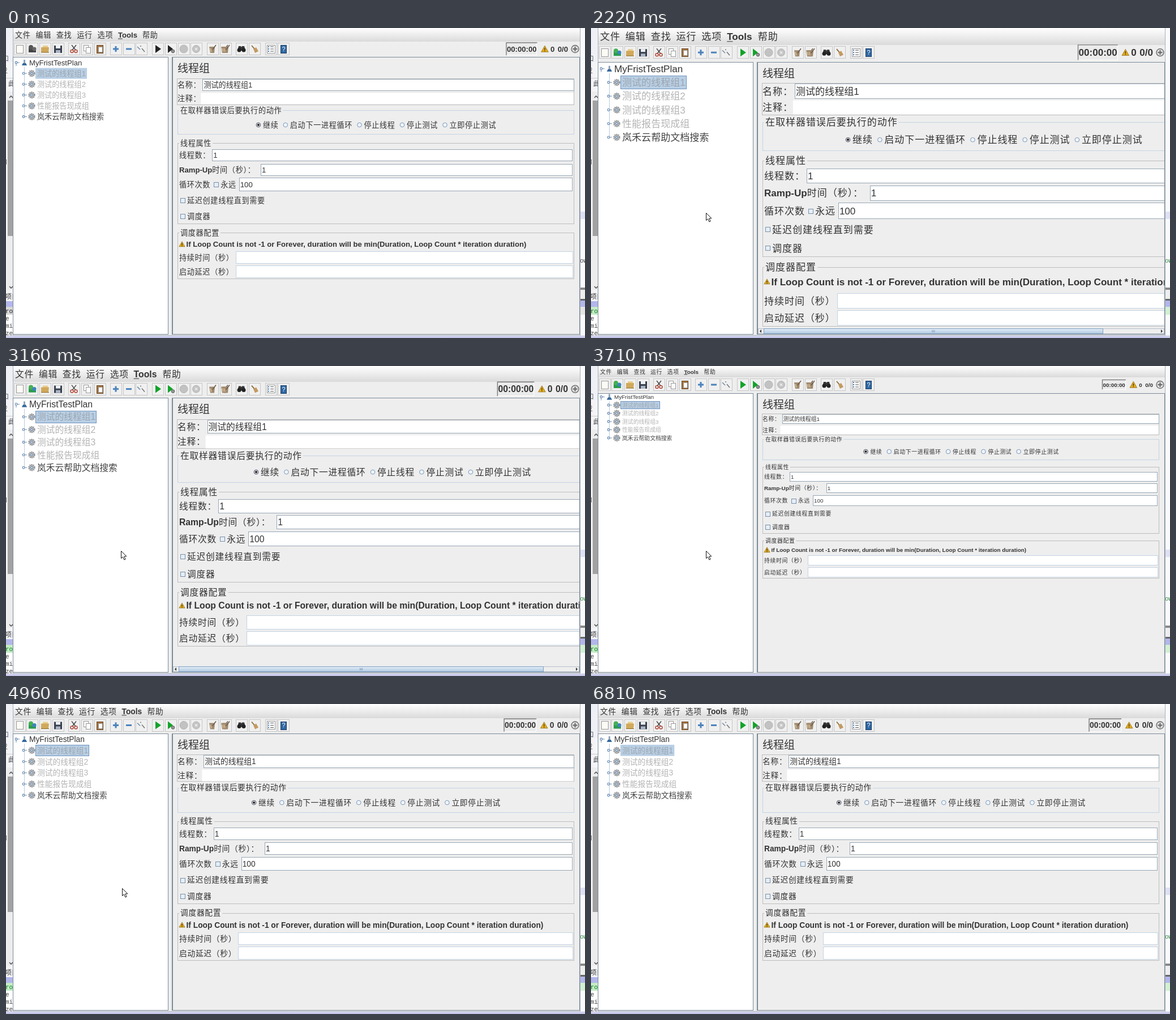
An HTML page with a canvas for the animation above (6900 ms loop, 1023x547 px).

```html
<!DOCTYPE html>
<html lang="zh">
<head>
<meta charset="utf-8">
<style>
html, body { margin: 0; width: 100%; height: 100%; overflow: hidden; background: #eee; }
canvas { display: block; }
</style>
</head>
<body>
<canvas id="stage" width="1023" height="547"></canvas>
<script>
const c = document.getElementById('stage').getContext('2d');
const LOOP = 6900;
const FAMILY = '"Liberation Sans", "Noto Sans CJK SC", "Noto Sans CJK", sans-serif';
const INK = '#333', STEEL = '#7a8a99', PALE = '#c4d3e2', GREY = '#bdbdbd';

// [start ms, font size] of every zoom step
const ZOOM = [[0, 20], [1360, 22], [1740, 24], [2220, 26], [2370, 29], [2760, 32], [2840, 35],
  [3010, 32], [3085, 28], [3160, 24], [3310, 22], [3480, 20], [3557, 18], [3633, 16], [3710, 15],
  [3950, 14], [4025, 13], [4100, 15], [4330, 17], [4650, 19], [4730, 20], [4960, 21],
  [5200, 19], [5430, 20], [5520, 21]];

let n, s, adv, right, live, focused;

// Layout value for the current size, from its values at sizes 15, 20, 22 and 32
function K(a, b, d, e) {
  if (n <= 20) return a + (b - a) * (n - 15) / 5;
  if (n <= 22) return b + (d - b) * (n - 20) / 2;
  return d + (e - d) * (n - 22) / 10;
}

function box(x, y, w, h, fill, line) {
  if (line) {
    const r = Math.round(x + w), b = Math.round(y + h);
    x = Math.round(x); y = Math.round(y); w = r - x; h = b - y;
  }
  if (fill) { c.fillStyle = fill; c.fillRect(x, y, w, h); }
  if (line) {
    c.strokeStyle = line; c.lineWidth = 1;
    c.strokeRect(x + .5, y + .5, w - 1, h - 1);
  }
}
function line(color, width, ...p) {
  c.strokeStyle = color; c.lineWidth = width;
  c.beginPath();
  for (let i = 0; i < p.length; i += 2) c.lineTo(p[i], p[i + 1]);
  c.stroke();
}
function poly(color, ...p) {
  c.fillStyle = color;
  c.beginPath();
  for (let i = 0; i < p.length; i += 2) c.lineTo(p[i], p[i + 1]);
  c.closePath(); c.fill();
}
function disc(x, y, r, fill, edge, w = 1) {
  c.beginPath(); c.arc(x, y, r, 0, 7);
  if (fill) { c.fillStyle = fill; c.fill(); }
  if (edge) { c.strokeStyle = edge; c.lineWidth = w; c.stroke(); }
}
function text(str, x, y, size = s, color = INK) {
  c.font = `${size}px ${FAMILY}`;
  c.letterSpacing = '0px';
  c.fillStyle = color;
  c.fillText(str, x, y + size * .36);
}
// Label with bold Latin and spaced, lighter ideographs. Returns the end x.
function label(str, x, y, draw = true) {
  c.fillStyle = INK;
  for (const run of str.match(/[\x20-\x7e]+|[^\x20-\x7e]+/g)) {
    const wide = run.charCodeAt(0) > 126;
    c.font = `${wide ? '' : 'bold '}${s}px ${FAMILY}`;
    c.letterSpacing = wide ? `${adv - s}px` : '0px';
    if (draw) c.fillText(run, x, y + s * .36);
    x += wide ? run.length * adv : c.measureText(run).width;
  }
  return x;
}

function backdrop() {
  box(0, 0, 1023, 547, '#f4f4f7');
  box(0, 0, 12, 60, '#eef0f6');
  text('口', -6, 54, 11, '#555');
  text('发', -8, 75, 11, '#555');
  line('#ccc', 1, 0, 88.5, 12, 88.5);
  text('此', 4, 98, 11, '#333');
  box(2, 112, 10, 350, '#ececec');
  box(3, 128, 9, 239, '#a2a2a2');
  line('#444', 1.3, 6, 123, 9, 120, 12, 123);
  line('#444', 1.3, 6, 456, 9, 459, 12, 456);
  text('和', -8, 236, 10, '#444');
  text('项目', -1, 474, 11, '#333');
  box(0, 482, 12, 10, '#b3b6ea');
  box(0, 492, 12, 14, live ? '#c4ecc4' : '#d8d8d8');
  box(0, 506, 12, 36, '#fff');
  c.font = '11px "Liberation Mono", monospace';
  c.letterSpacing = '0px';
  c.fillStyle = live ? '#087a20' : '#222';
  c.fillText('rov', -1, 503);
  c.fillStyle = '#444';
  ['e', 'mi', 'ze'].forEach((w, i) => c.fillText(w, -1, 516 + i * 13));

  box(1014, 0, 9, 547, '#fafafc');
  box(1015, 324, 8, 13, '#dfe0f4');
  c.fillStyle = live ? '#2e8b3e' : '#444';
  c.fillText('ow', 1014, 414);
  box(1015, 458, 8, 4, '#888');
  box(1015, 462, 8, 16, '#eee');
  box(1015, 478, 8, 3, '#666');
  box(1015, 481, 8, 11, '#b3b6ea');
  box(1015, 492, 8, 14, live ? '#d2f0d2' : '#e4e4e4');
  box(0, 542, 1023, 5, '#dcdcf2');
  line('#a9a9de', 1, 0, 545.5, 1023, 545.5);
  box(12, 0, 1003, 543, '#eee', '#a8b0ba');
}

function warning(x, y, k) {
  poly('#e0ab20', x, y - 5.5 * k, x + 6 * k, y + 5 * k, x - 6 * k, y + 5 * k);
  line('#8a6510', .7, x, y - 5.5 * k, x + 6 * k, y + 5 * k, x - 6 * k, y + 5 * k, x, y - 5.5 * k);
  line('#3a2a00', 1.2, x, y - 2 * k, x, y + 2 * k);
  box(x - .6, y + 2.8 * k, 1.2, 1.2, '#3a2a00');
}

function broom(x, y, flip) {
  line('#8b6b35', 1.8, x - 5 * flip, y - 6, x + flip, y + 1);
  poly('#c39a62', x - 2 * flip, y, x + 3 * flip, y - 3, x + 7 * flip, y + 4, x + flip, y + 7);
}
// Broom leaning over a small pot
function sweep(x, y) {
  poly('#a08a70', x - 6, y - 4, x + 4, y - 4, x + 3, y + 7, x - 4, y + 7);
  line('#6d5a48', 1.6, x + 6, y - 7, x, y + 1);
  line('#d8c39a', 1.5, x - 4, y - 1, x - 2, y + 5);
}

function sheet(x, y, w, h, fill = '#fff') { box(x - w / 2, y - h / 2, w, h, fill, '#999'); }

function glyphs(y) {
  const go = live ? '#12a32a' : '#222';
  const at = (x, f) => { box(x - 10.5, y - 11, 21, 22, '#f0f0f0', '#c6c6c6'); f(x); };
  at(24, x => sheet(x, y, 13, 15, '#fbfaf5'));
  at(46, x => {
    box(x - 6, y - 2, 13, 8, live ? '#2b9c4a' : '#444');
    disc(x - 2, y - 3, 4, live ? '#45b053' : '#555');
    disc(x + 4, y, 3.5, live ? '#3f83bd' : '#666');
  });
  at(69, x => {
    box(x - 4, y - 6, 9, 6, '#e9ce8c');
    poly('#d0a95c', x - 7, y - 3, x + 7, y - 3, x + 6, y + 6, x - 7, y + 6);
    line('#8c6a24', 1, x - 7, y + 6, x + 7, y + 6);
  });
  at(92, x => {
    box(x - 7, y - 6, 14, 13, '#39404e');
    box(x - 4, y - 6, 8, 5, '#eef2f8');
    box(x - 4, y + 2, 8, 5, '#aab4c4');
  });
  at(120, x => {
    line('#444', 1.4, x - 4, y - 7, x + 3, y + 2);
    line('#444', 1.4, x + 4, y - 7, x - 3, y + 2);
    disc(x - 3.5, y + 4, 2.5, null, '#b04a3a', 1.5);
    disc(x + 3.5, y + 4, 2.5, null, '#b04a3a', 1.5);
  });
  at(143, x => { sheet(x - 2, y - 2, 9, 11); sheet(x + 2, y + 2, 9, 11); });
  at(166, x => { box(x - 6, y - 7, 12, 15, '#a5713a', '#6a4a28'); sheet(x + 1, y + 1, 8, 10); });
  at(194, x => { box(x - 5, y - 1.5, 10, 3, '#4c83bd'); box(x - 1.5, y - 5, 3, 10, '#4c83bd'); });
  at(217, x => box(x - 5, y - 1.5, 10, 3, '#4c83bd'));
  at(239, x => {
    line('#6c8cab', 1.5, x - 7, y - 4, x - 2, y + 1);
    line('#777', 1.5, x + 1, y - 1, x + 6, y + 5);
    disc(x - 1, y - 5, 1, '#777');
  });
  at(268, x => poly(go, x - 4, y - 7, x + 6, y, x - 4, y + 7));
  at(291, x => {
    poly(go, x - 5, y - 7, x + 4, y, x - 5, y + 7);
    disc(x + 4, y + 4, 2.8, '#999', '#555');
  });
  at(314, x => disc(x, y, 7, '#c2c2c2', '#b4b4b4'));
  at(336, x => {
    disc(x, y, 6.5, '#c4c4c4', '#b4b4b4');
    line('#eee', 1.4, x - 2, y - 2, x + 2, y + 2);
    line('#eee', 1.4, x + 2, y - 2, x - 2, y + 2);
  });
  at(365, x => sweep(x, y));
  at(388, x => { sweep(x - 2, y); sweep(x + 1, y); });
  at(416, x => {
    poly('#333', x - 5, y - 5, x - 1, y - 5, x, y - 3, x + 1, y - 5, x + 5, y - 5, x + 7, y + 3, x - 7, y + 3);
    disc(x - 4, y + 2, 3.5, '#222'); disc(x + 4, y + 2, 3.5, '#222');
  });
  at(439, x => broom(x, y, 1));
  at(468, x => {
    sheet(x, y, 15, 15);
    for (let i = -4; i < 6; i += 4) {
      box(x - 5, y + i - 1, 2, 2, '#3a6ea5');
      box(x - 1, y + i - .5, 6, 1, '#555');
    }
  });
  at(490, x => {
    box(x - 5, y - 7, 11, 15, '#2f67a2', '#1e3f66');
    text('?', x - 2.5, y, 11, '#fff');
  });
}

function header() {
  const mh = K(20, 24, 26, 36), my = K(10, 12.5, 13.5, 18), ty = K(33, 37, 38, 51);
  const g = c.createLinearGradient(0, 0, 0, mh);
  g.addColorStop(0, '#fff'); g.addColorStop(1, '#dadada');
  box(13, 0, 1001, mh, g);
  const step = K(29.7, 36.4, 39, 53.6);
  ['文件', '编辑', '查找', '运行', '选项'].forEach((m, i) => label(m, 16 + i * step, my));
  const tx = 16 + step * 5;
  label('Tools', tx, my);
  line(INK, 1, tx, my + s * .5, tx + s * .6, my + s * .5);
  label('帮助', tx + K(35, 43, 47, 66), my);
  glyphs(ty);

  const rx = 993 - 1.39 * s, zx = rx - 5.5 - .556 * s, end = zx - 23.5;
  label('0/0', rx, ty);
  label('0', zx, ty);
  warning(zx - 10, ty, 1.05);
  const bh = K(17, 22, 23, 32), bx = end - 4 * s - 2;
  box(bx, ty - bh / 2, end - bx, bh, '#ebebeb', '#fff');
  line('#777', 1.4, bx, ty + bh / 2, bx, ty - bh / 2, end, ty - bh / 2);
  label('00:00:00', bx + 1, ty);
  disc(1005.5, ty, 6.5, '#ddd', '#666', 1.3);
  line('#666', 2, 1001.5, ty, 1009.5, ty);
  line('#666', 2, 1005.5, ty - 4, 1005.5, ty + 4);
}

function gear(x, y) {
  c.setLineDash([2, 1.4]);
  disc(x, y, 5.4, null, '#8a8a8a', 1.6);
  c.setLineDash([]);
  disc(x, y, 4.2, '#c3c9d0', '#808080');
  disc(x, y, 1.9, '#dcebf8', '#45688c');
}
function handle(x, y) {
  line('#6f8fb5', 1, x, y, x + 5, y);
  disc(x - 1, y, 1.9, '#fff', '#5c7fa8', 1.1);
}

function tree(P) {
  box(12, P, 275, 541 - P, '#fff', STEEL);
  const y0 = K(54.5, 61, 63, 85), pitch = K(14.5, 19.1, 20.5, 29.8);
  handle(19, y0);
  line('#6f8fb5', 1, 18, y0 + 2, 18, y0 + 6);
  poly('#8fa6bd', 31, y0 - 5, 34, y0 - 5, 34, y0, 37, y0 + 5, 28, y0 + 5, 31, y0);
  poly('#35689c', 30, y0 + 1, 35, y0 + 1, 37, y0 + 5, 28, y0 + 5);
  text('MyFristTestPlan', 41, y0);
  line('#b9cbe0', 1, 32.5, y0 + 8, 32.5, y0 + pitch * 5);
  const items = ['测试的线程组1', '测试的线程组2', '测试的线程组3', '性能报告现成组', '岚禾云帮助文档搜索'];
  items.forEach((name, i) => {
    const y = y0 + pitch * (i + 1);
    handle(32, y);
    gear(45.5, y);
    if (!i) box(52, y - pitch / 2, 6.556 * s + 5, pitch, '#b8cfe5', focused && '#6f92bd');
    text(name, 55, y, s, i < 4 ? (i ? '#b3b3b3' : '#9da5ae') : '#444');
  });
}

function group(title, top, bottom, edge) {
  box(303, top, right - 303, bottom - top, null, edge);
  const end = label(title, 308, top, false);
  box(306, top - 3, end - 304, 6, '#eee');
  label(title, 308, top);
}
function field(x, y, h, to, value, edge = '#98a6b4') {
  box(x, y - h / 2, to - x, h, '#fff', edge);
  if (value) text(value, x + 2, y);
}
function check(x, y) {
  box(x - 4, y - 4, 9, 9, '#e4eef8', '#7b8fa6');
}

function scrollbar(x, y, w, h) {
  const flat = w > h, start = flat ? x : y, len = flat ? w : h;
  box(x, y, w, h, '#eee', '#b5bfc9');
  const view = flat ? w : h + 10;
  const full = flat ? right - 285 : K(326, 392, 410, 553) + 15;
  const size = (len - 20) * Math.min(1, view / full);
  const g = flat ? c.createLinearGradient(0, y, 0, y + h) : c.createLinearGradient(x, 0, x + w, 0);
  g.addColorStop(0, '#e8f1fa'); g.addColorStop(1, '#a9c4de');
  const m = start + 10 + size / 2;
  if (flat) {
    box(x + 10, y, size, h, g, '#7f9fc2');
    poly('#333', x + 3, y + 5, x + 6, y + 2, x + 6, y + 8);
    poly('#333', x + w - 3, y + 5, x + w - 6, y + 2, x + w - 6, y + 8);
    for (const i of [-2, 0, 2]) line('#7f9fc2', 1, m + i, y + 3, m + i, y + 7);
  } else {
    box(x, y + 10, w, size, g, '#7f9fc2');
    poly('#333', x + 5, y + 3, x + 2, y + 6, x + 8, y + 6);
    poly('#333', x + 5, y + h - 3, x + 2, y + h - 6, x + 8, y + h - 6);
    for (const i of [-2, 0, 2]) line('#7f9fc2', 1, x + 3, m + i, x + 7, m + i);
  }
}

function form(P) {
  const wide = n >= 24, tall = n >= 27;
  const clipX = tall ? 1002 : 1013, clipY = wide ? 530 : 541;
  right = wide ? 1062 + 29.3 * (n - 24) : 1004;
  box(294, P, 720, 541 - P, '#eee');
  c.save();
  c.beginPath(); c.rect(295, P, clipX - 295, clipY - P); c.clip();

  text('线程组', 303, P + 20, 19);

  const ny = K(93.5, 100.3, 102.5, 125), cy = K(113, 124.5, 127.5, 159);
  const nh = K(17.5, 21.5, 23, 32), ch = K(16, 20, 21, 31);
  box(302, ny - nh / 2 - 1, right - 302, cy + ch / 2 - ny + nh / 2 + 2, null, GREY);
  const nx = label('名称：', 303, ny) + 3;
  field(nx, ny, nh, right, '测试的线程组1');
  label('注释：', 303, cy);
  box(nx - 3, cy - ch / 2, right - nx + 2, ch, '#fff');

  group('在取样器错误后要执行的动作', K(129, 145, 150, 190), K(166, 188, 195, 250), PALE);
  const ry = K(151, 171, 177, 227.5);
  let x = (303 + right) / 2 - (24 * adv + 94) / 2 + 5;
  ['继续', '启动下一进程循环', '停止线程', '停止测试', '立即停止测试'].forEach((name, i) => {
    disc(x, ry, 3.8, '#eef4fa', i ? '#7b98b8' : '#445', 1);
    if (!i) disc(x, ry, 2.1, '#222');
    x = label(name, x + 8, ry) + 12.3;
  });

  group('线程属性', K(178, 203, 210, 270), K(296, 346, 360, 471), GREY);
  const fh = K(17, 21, 23, 32), to = right - 3;
  const row = (name, y, value) => field(label(name, 306, y) + 3, y, fh, to, value);
  row('线程数：', K(195, 224.5, 233.5, 302), '1');
  row('Ramp-Up时间（秒）：', K(215.5, 250, 260, 338), '1');
  const ly = K(237.5, 276, 287.5, 375);
  const lx = label('循环次数', 306, ly) + 10;
  check(lx, ly);
  field(label('永远', lx + 8, ly) + 5, ly, K(19.5, 24, 25, 34), to, '100');
  const option = (name, y) => { check(312, y); label(name, 320, y); };
  option('延迟创建线程直到需要', K(260.5, 304, 317, 413));
  option('调度器', K(284, 332, 346, 452));

  group('调度器配置', K(308, 361, 376, 491), K(375, 443, 463, 623), GREY);
  const wy = K(324.5, 381.5, 398, 522);
  warning(311, wy, .85);
  label('If Loop Count is not -1 or Forever, duration will be min(Duration, Loop Count * iteration duration)', 318.5, wy);
  const blank = (name, y) => field(label(name, 306, y) + 3, y, K(18, 22, 23.5, 32), to + 1, '', PALE);
  blank('持续时间（秒）', K(343, 405, 423, 570));
  blank('启动延迟（秒）', K(364, 430, 449.5, 605));
  c.restore();

  if (wide) scrollbar(295, 530, clipX - 295, 10);
  if (tall) scrollbar(1003, P + 1, 10, 530 - P);
  box(293, P, 721, 541 - P, null, STEEL);
  line(STEEL, 1, 294.5, P, 294.5, 541);
}

function pointerAt(t) {
  const tick = (from, gap) => Math.floor((t - from) / gap);
  if (t < 70 || t >= 6430) return null;
  if (t < 530) {
    const k = tick(70, 76.7) / 6, e = 1 - (1 - k) ** 2;
    return [818 - 618 * e, 470 - 141 * e];
  }
  if (t < 1990) return [200, 329];
  if (t < 3950) return [203, 326];
  if (t < 6040) return [205, 325];
  const k = (tick(6040, 78) + 1) / 5, e = k ** 1.6;
  return [205 + 805 * e, 325 + 186 * e];
}
function pointer([x, y]) {
  const p = [0, 0, 0, 13, 3, 10.3, 5.4, 15.5, 7.6, 14.5, 5.3, 9.5, 9.4, 9.3];
  const q = p.map((v, i) => v + (i % 2 ? y : x) + .5);
  poly('#fff', ...q);
  line('#111', 1, ...q, q[0], q[1]);
}

function draw(t) {
  n = ZOOM.filter(z => z[0] <= t).pop()[1];
  s = .656 * n;
  adv = K(10.5, 13.8, 15.1, 22.3);
  live = t >= 680;
  focused = live && t < 6810;
  const P = Math.round(K(48, 51, 53, 70));
  backdrop();
  header();
  tree(P);
  form(P);
  const p = pointerAt(t);
  if (p) pointer(p);
}

function frame() {
  draw(performance.now() % LOOP);
  requestAnimationFrame(frame);
}
frame();
</script>
</body>
</html>
```
